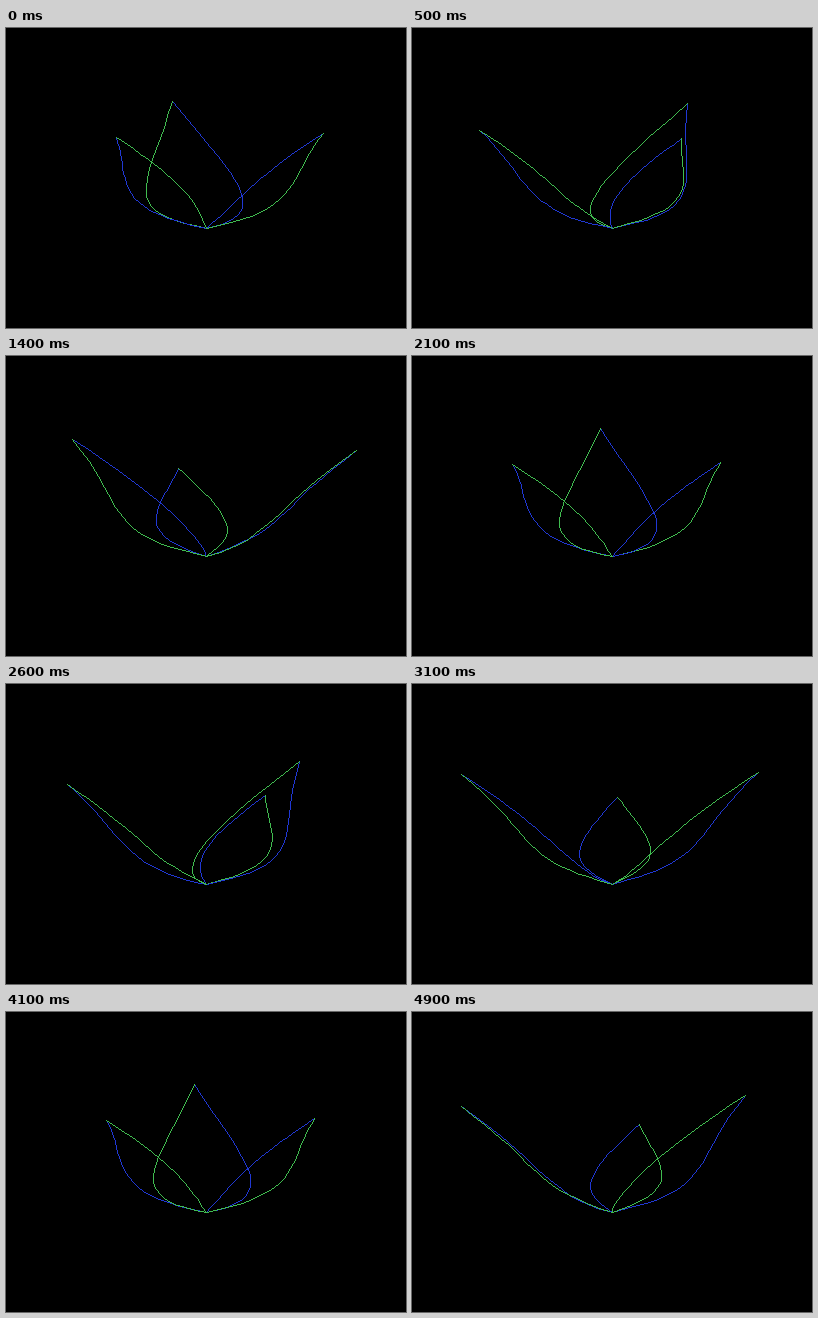
Animation of 400 by 300 pixels, one loop 5000 ms. Source, as an HTML page with a canvas:

```html
<!DOCTYPE html>
<html lang="en">
<head>
<meta charset="utf-8">
<title>Turning petals</title>
<style>
  html, body { margin: 0; width: 100%; height: 100%; overflow: hidden; background: #000; }
  canvas { display: block; width: 400px; height: 300px; image-rendering: pixelated; }
</style>
</head>
<body>
<canvas id="stage" width="400" height="300"></canvas>
<script>
const ctx = document.getElementById('stage').getContext('2d');
const W = 400, H = 300;
const LOOP = 5000, STEP = 100;
const CAMERA = 400;
const SEGMENTS = 20;
const GREEN = '#40bc50', BLUE = '#2038d4';

// Petal edge as a cubic curve: base, two handles, tip.
const EDGE = [[0, 50, 0], [100, 30, 0], [75, 0, 25], [100, -50, 100]];

function edgePoint(t) {
  const s = 1 - t;
  const w = [s * s * s, 3 * s * s * t, 3 * s * t * t, t * t * t];
  return [0, 1, 2].map(axis => EDGE.reduce((sum, p, i) => sum + w[i] * p[axis], 0));
}

const edge = Array.from({ length: SEGMENTS + 1 }, (_, i) => edgePoint(i / SEGMENTS));

// Turns a point around the upright axis and projects it; side mirrors the edge.
function project([x, y, z], angle, side) {
  const along = (x + z) * Math.SQRT1_2;
  const across = side * (x - z) * Math.SQRT1_2;
  const sin = Math.sin(angle), cos = Math.cos(angle);
  const scale = CAMERA / (CAMERA - along * cos + across * sin);
  return [
    Math.floor(W / 2 + (along * sin + across * cos) * scale + 1e-6),
    Math.floor(H / 2 + y * scale + 1e-6)
  ];
}

// Hard-edged line, one pixel wide.
function line([x, y], [x1, y1]) {
  const dx = Math.abs(x1 - x), dy = -Math.abs(y1 - y);
  const sx = x < x1 ? 1 : -1, sy = y < y1 ? 1 : -1;
  let err = dx + dy;
  for (;;) {
    ctx.fillRect(x, y, 1, 1);
    if (x === x1 && y === y1) return;
    const e2 = 2 * err;
    if (e2 >= dy) { err += dy; x += sx; }
    if (e2 <= dx) { err += dx; y += sy; }
  }
}

function drawEdge(angle, side, color) {
  ctx.fillStyle = color;
  const pts = edge.map(p => project(p, angle, side));
  for (let i = 1; i < pts.length; i++) line(pts[i - 1], pts[i]);
}

function draw(time) {
  const step = Math.floor((time % LOOP) / STEP);
  ctx.fillStyle = '#000';
  ctx.fillRect(0, 0, W, H);
  for (let i = 0; i < 3; i++) {
    const angle = (6 * step - 9 + 120 * i) * Math.PI / 180;
    drawEdge(angle, 1, BLUE);
    drawEdge(angle, -1, GREEN);
  }
}

const start = performance.now();
function tick() {
  draw(performance.now() - start);
  requestAnimationFrame(tick);
}
tick();
</script>
</body>
</html>
```
